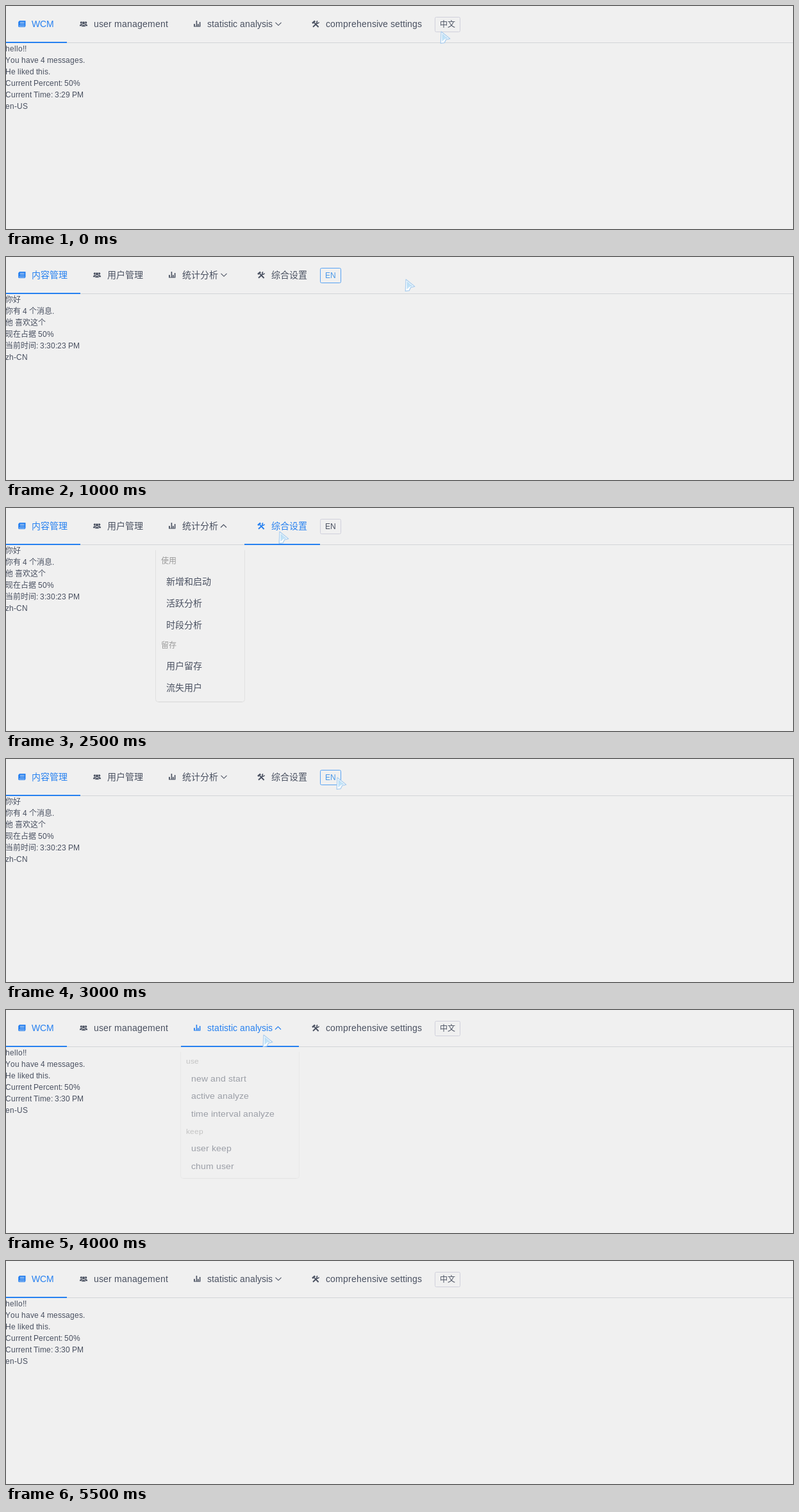
An HTML page for the animation above (6 s loop, 1228 by 349 pixels).

```html
<!DOCTYPE html>
<html lang="zh-CN">
<head>
<meta charset="utf-8">
<style>
  html, body { margin: 0; width: 100%; height: 100%; overflow: hidden; background: #f0f0f0; }
  svg { display: block; }
  text { font-family: "Liberation Sans", Arial, "Noto Sans CJK SC", "Noto Sans CJK", sans-serif; }
</style>
</head>
<body>
<svg id="stage" width="1228" height="349" viewBox="0 0 1228 349">
  <defs>
    <linearGradient id="ice" x1="0" y1="0" x2="1" y2="1">
      <stop offset="0" stop-color="#b4daf3"/>
      <stop offset=".55" stop-color="#c4e4f8"/>
      <stop offset="1" stop-color="#88bde8"/>
    </linearGradient>
    <g id="pointer">
      <path d="M2 1L15.8 12.2L9.6 13.6L7 18.6L1.2 19.4Z" fill="#fff" stroke="#a9cdee" stroke-width="1.2" stroke-linejoin="round"/>
      <path d="M3.6 4L12.4 11.4L8 12.6L3.2 16.8Z" fill="url(#ice)"/>
    </g>
    <g id="book">
      <path d="M1 1H10.5V9L9.5 11H0L-.8 10V3Z"/>
      <path d="M2 3.5H8.5M2 6H8.5M.5 9.3H9" stroke="#f0f0f0" stroke-width=".8"/>
    </g>
    <g id="people">
      <circle cx="2.5" cy="4" r="1.8"/><circle cx="9.5" cy="4" r="1.8"/>
      <path d="M-.2 9.3Q0 6.3 3 6.3H9Q12 6.3 12.2 9.3Z"/>
      <path d="M2.6 10.6Q2.8 7.2 6 7.2T9.4 10.6Z" stroke="#f0f0f0" stroke-width=".7"/>
      <circle cx="6" cy="4.5" r="2.4" stroke="#f0f0f0" stroke-width=".6"/>
    </g>
    <path id="bars" d="M0 6H1.8V10H0ZM3.6 1H5.2V10H3.6ZM6 6H7.6V10H6ZM8.8 3H10.4V10H8.8ZM0 9.4H10.4V10.4H0Z"/>
    <g id="tools" fill="none" stroke="currentColor">
      <path d="M4.2 4.4L10.6 11" stroke-width="2"/>
      <path d="M1 5L5.2 1.6" stroke-width="2.6"/>
      <path d="M2 10.8L8.6 4.6" stroke-width="1.9"/>
      <path d="M9.2 1.4Q7.2 2.6 8.2 4.4T11.6 3.6" stroke-width="1.5"/>
    </g>
  </defs>
  <g id="scene"></g>
</svg>
<script>
const INK = "#495060", BLUE = "#2680f0", MUTED = "#999";
const ICONS = ["book", "people", "bars", "tools"];
const LABEL_DX = [40, 42, 41, 42];

const PAGES = {
  en: {
    starts: [0, 95, 273, 457, 669],
    labels: ["WCM", "user management", "statistic analysis", "comprehensive settings"],
    chevron: 425,
    button: { label: "中文", width: 40 },
    body: time => ["hello!!", "You have 4 messages.", "He liked this.",
      "Current Percent: 50%", `Current Time: ${time}`, "en-US"],
    menu: {
      bottom: 289,
      groups: [["use", 87], ["keep", 210]],
      items: [["new and start", 118], ["active analyze", 149], ["time interval analyze", 180],
        ["user keep", 241], ["chum user", 272]]
    }
  },
  zh: {
    starts: [0, 116, 234, 372, 490],
    labels: ["内容管理", "用户管理", "统计分析", "综合设置"],
    chevron: 340,
    button: { label: "EN", width: 33 },
    body: time => ["你好", "你有 4 个消息.", "他 喜欢这个",
      "现在占据 50%", `当前时间: ${time}`, "zh-CN"],
    menu: {
      bottom: 304,
      groups: [["使用", 87], ["留存", 219]],
      items: [["新增和启动", 120], ["活跃分析", 154], ["时段分析", 188],
        ["用户留存", 252], ["流失用户", 286]]
    }
  }
};

// hover: nav index, 4 is the language button; open: how far the menu is unfolded
const STEP = 500;
const STEPS = [
  { page: "en", time: "3:29 PM", at: [677, 39] },
  { page: "en", time: "3:29 PM", hover: 4, at: [684, 33] },
  { page: "zh", time: "3:30:23 PM", hover: 4, at: [622, 34] },
  { page: "zh", time: "3:30:23 PM", at: [436, 103] },
  { page: "zh", time: "3:30:23 PM", hover: 2, open: 1, at: [301, 34] },
  { page: "zh", time: "3:30:23 PM", hover: 3, open: 1, at: [425, 36] },
  { page: "zh", time: "3:30:23 PM", hover: 4, at: [515, 28] },
  { page: "en", time: "3:30 PM", hover: 3, at: [503, 33] },
  { page: "en", time: "3:30 PM", hover: 2, open: .5, at: [400, 38] },
  { page: "en", time: "3:30 PM", hover: 2, open: 1, at: [425, 38] },
  { page: "en", time: "3:30 PM", at: [560, 208] },
  { page: "en", time: "3:30 PM" }
];

const pen = document.createElement("canvas").getContext("2d");

// Glyph advances snap to whole pixels, as in hinted screen text.
function text(str, x, y, size, fill = INK) {
  pen.font = `${size}px "Liberation Sans", Arial, "Noto Sans CJK SC", "Noto Sans CJK", sans-serif`;
  const xs = [...str].map(ch => {
    const left = x;
    x += Math.round(pen.measureText(ch).width);
    return left;
  });
  return `<text x="${xs.join(" ")}" y="${y}" font-size="${size}" fill="${fill}">${str}</text>`;
}

const use = (id, x, y, color = INK) =>
  `<use href="#${id}" x="${x}" y="${y}" fill="${color}" color="${color}"/>`;

function navItem(page, i, lit) {
  const x = page.starts[i], color = lit ? BLUE : INK;
  const line = lit ? `<rect x="${x}" y="56" width="${page.starts[i + 1] - x}" height="2" fill="${BLUE}"/>` : "";
  return use(ICONS[i], x + 20, 22, color) + text(page.labels[i], x + LABEL_DX[i], 33, 14, color) + line;
}

function chevron(x, up, lit) {
  const d = up ? `M${x - 5} 30.5l4.5 -4.5l4.5 4.5` : `M${x - 4.5} 25.8l4.5 4.5l4.5 -4.5`;
  return `<path d="${d}" fill="none" stroke="${lit ? BLUE : INK}" stroke-width="1.1"/>`;
}

function button(page, lit) {
  const x = page.starts[4], { label, width } = page.button;
  return `<rect x="${x + .5}" y="17.5" width="${width - 1}" height="23" rx="2" fill="none" stroke="${lit ? "#57a3f3" : "#d0d0dc"}"/>`
    + text(label, x + 8, 33, 12, lit ? "#4a98e8" : INK);
}

function dropdown(page, open) {
  const { bottom, groups, items } = page.menu;
  const left = page.starts[2] - .5, right = page.starts[3] + .5;
  const fold = `translate(0 62) scale(1 ${.78 + .22 * open}) translate(0 -62)`;
  return `<g opacity="${open}" transform="${fold}">
    <path d="M${left} 66V${bottom - 4.5}q0 4 4 4H${right - 4}q4 0 4 -4V66" fill="#f0f0f0" stroke="#e0e0e0"/>
    <path d="M${left + 4} ${bottom - .5}H${right - 4}" stroke="#d6d6d6"/>`
    + groups.map(([s, y]) => text(s, left + 8.5, y, 12, MUTED)).join("")
    + items.map(([s, y]) => text(s, left + 16.5, y, 14)).join("") + "</g>";
}

function draw({ page: name, time, hover, open = 0, at }) {
  const page = PAGES[name];
  return `<rect y="57" width="1228" height="1" fill="#d2d5d8"/>`
    + page.labels.map((_, i) => navItem(page, i, i === 0 || i === hover)).join("")
    + chevron(page.chevron, open > 0, hover === 2)
    + button(page, hover === 4)
    + page.body(time).map((s, i) => text(s, -1, 71 + 18 * i, 12)).join("")
    + (open ? dropdown(page, open) : "")
    + (at ? use("pointer", ...at) : "");
}

const scene = document.getElementById("scene");
const start = performance.now();
let shown = -1;

function tick() {
  const step = Math.floor((performance.now() - start) / STEP) % STEPS.length;
  if (step !== shown) {
    scene.innerHTML = draw(STEPS[step]);
    shown = step;
  }
  requestAnimationFrame(tick);
}
tick();
</script>
</body>
</html>
```
